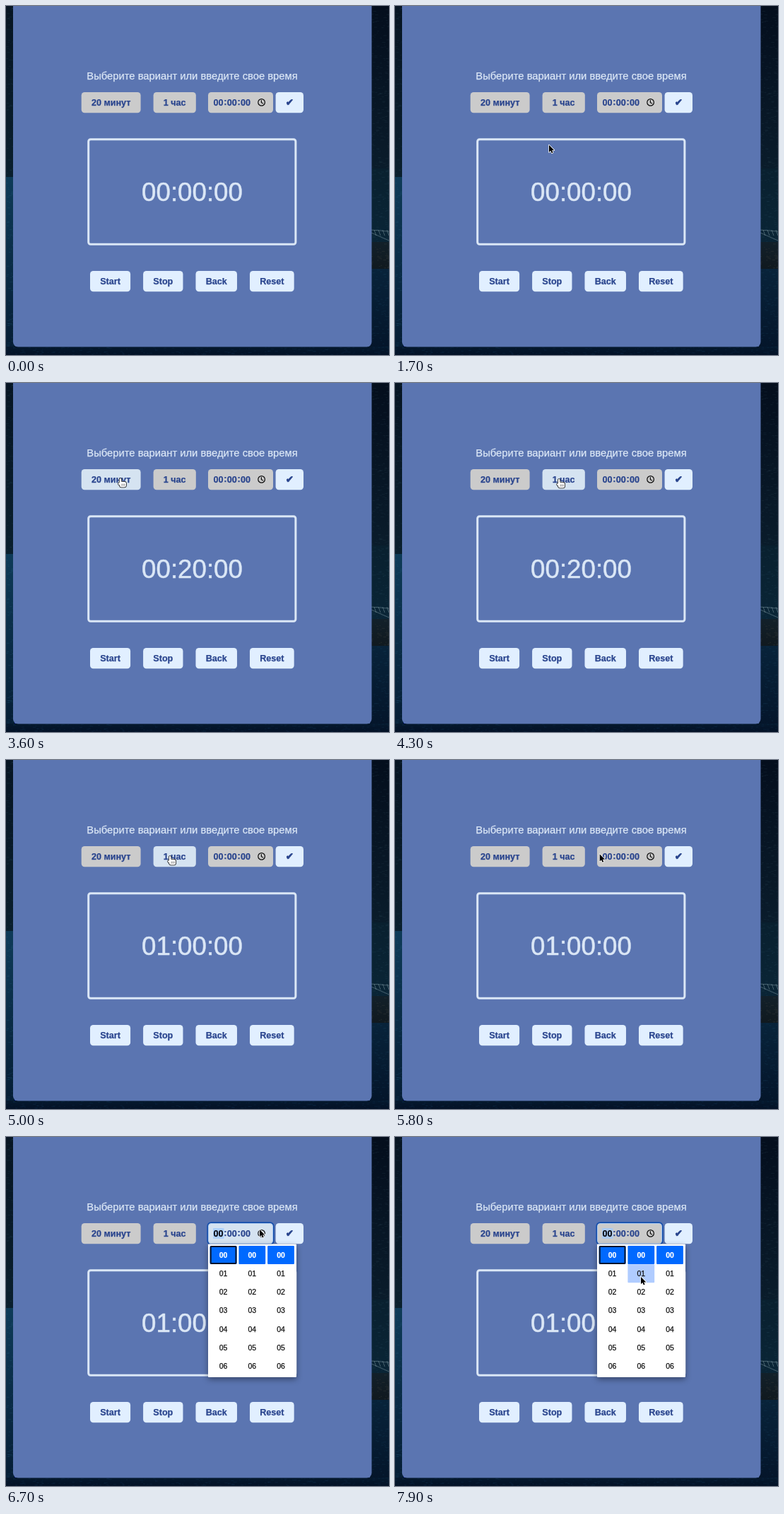
Animation, 542 px wide and 494 px high, one loop 8000 ms. Source, as an HTML page with a canvas:

```html
<!DOCTYPE html>
<html lang="ru">
<head>
<meta charset="utf-8">
<title>Timer</title>
<style>
  html, body { margin: 0; width: 100%; height: 100%; overflow: hidden; background: #06182a; }
  canvas { display: block; width: 542px; height: 494px; }
</style>
</head>
<body>
<canvas id="stage" width="542" height="494"></canvas>
<script>
const W = 542, H = 494, LOOP = 8000, STEP = 100;
const ctx = document.getElementById('stage').getContext('2d');
const FONT = '"Liberation Sans", Arial, sans-serif';
const BOLD = `bold 12.6px ${FONT}`, CHECK = '13.5px "DejaVu Sans", sans-serif';
const PANEL = '#5b75b1', PALE = '#dbe7f6', LIGHT = '#e1efff';
const GRAY = '#cbcbcb', HOVER = '#d5e3f1', NAVY = '#2a458e', BLUE = '#0069ff';
const BTN_H = 29.2, GAP = 18, PAD = 14.2;

// What the viewer does
const PRESS_20 = 2900, SET_20 = 3100, PRESS_60 = 4800, SET_60 = 5000, OPEN_AT = 6600;
const ENTRY = { x: 531, y: 450 };
const MOVES = [
  { start: 900, end: 1200, x: 295, y: 317 },
  { start: 1400, end: 2200, x: 160, y: 135 },
  { start: 3590, end: 4300, x: 232, y: 136 },
  { start: 5560, end: 6400, x: 359, y: 131 },
  { start: 6700, end: 7600, x: 348, y: 198 }
];

const easeOut = (p, power) => 1 - (1 - p) ** power;
const inside = (p, b) => p && p.x >= b.x && p.x < b.x + b.w && p.y >= b.y && p.y < b.y + b.h;

function box(x, y, w, h, r, fill, stroke, lw) {
  ctx.beginPath();
  ctx.roundRect(x, y, w, h, r);
  if (fill) { ctx.fillStyle = fill; ctx.fill(); }
  if (stroke) { ctx.strokeStyle = stroke; ctx.lineWidth = lw; ctx.stroke(); }
}

// A hairline stroke gives the slightly heavier look of desktop smoothing
function text(s, x, y, font, color, align = 'center', weight = .25) {
  ctx.font = font;
  ctx.fillStyle = ctx.strokeStyle = color;
  ctx.textAlign = align;
  ctx.lineWidth = weight;
  ctx.lineJoin = 'round';
  ctx.fillText(s, x, y);
  ctx.strokeText(s, x, y);
}

function layoutRow(x, y, labels) {
  return labels.map(label => {
    ctx.font = BOLD;
    const w = ctx.measureText(label).width + PAD * 2;
    const b = { label, x, y, w, h: BTN_H };
    x += w + GAP;
    return b;
  });
}
const options = layoutRow(106.7, 122, ['20 минут', '1 час']);
const controls = layoutRow(119, 375, ['Start', 'Stop', 'Back', 'Reset']);
const input = { x: 286, y: 122, w: 92, h: BTN_H };
const check = { x: 381.6, y: 122, w: 39.4, h: BTN_H };
const clickable = [...options, ...controls, check];

function makeScene() {
  const c = document.createElement('canvas');
  c.width = W; c.height = H;
  const g = c.getContext('2d');
  let seed = 17;
  const rnd = () => (seed = seed * 16807 % 2147483647) / 2147483647;

  // A shaded area with faint streaks of rock or water
  const area = (x, y, w, h, top, bottom, streak) => {
    const grad = g.createLinearGradient(0, y, 0, y + h);
    grad.addColorStop(0, top);
    grad.addColorStop(1, bottom);
    g.fillStyle = grad;
    g.fillRect(x, y, w, h);
    g.fillStyle = streak;
    for (let i = 0; i < w * h / 32; i++) {
      g.fillRect(x + rnd() * w, y + rnd() * h, 1 + rnd() * 4, 1);
    }
  };
  area(0, 0, 12, 242, '#071523', '#0a1f2d', 'rgba(40,75,95,.2)');
  area(0, 242, 12, 252, '#0e3b58', '#051c33', 'rgba(45,105,140,.2)');
  area(515, 0, 27, 230, '#040e1d', '#0a1c2b', 'rgba(45,70,85,.2)');
  area(515, 230, 27, 104, '#09202f', '#0a2536', 'rgba(45,80,100,.2)');
  area(515, 334, 27, 38, '#12202a', '#10191f', 'rgba(85,85,75,.25)');
  area(515, 372, 27, 122, '#08233a', '#041429', 'rgba(30,75,105,.2)');
  area(0, 482, W, 12, '#05192e', '#031126', 'rgba(25,65,100,.22)');

  // Pier on the right shore
  g.strokeStyle = 'rgba(130,155,165,.5)';
  g.beginPath();
  g.moveTo(517, 317); g.lineTo(W, 319);
  g.moveTo(517, 321); g.lineTo(W, 332);
  for (let x = 521; x < W; x += 6) { g.moveTo(x, 317); g.lineTo(x + 3, 325); }
  g.stroke();

  g.fillStyle = PANEL;
  g.beginPath();
  g.roundRect(10, -10, 507.5, 492.5, 7);
  g.fill();
  return c;
}
const scene = makeScene();

function pointer(t) {
  if (t < MOVES[0].start) return null;
  let { x, y } = ENTRY;
  for (const m of MOVES) {
    if (t < m.start) break;
    const p = Math.min(1, (t - m.start) / (m.end - m.start));
    x += (m.x - x) * easeOut(p, 1.8);
    y += (m.y - y) * easeOut(p, 2.3);
  }
  return { x, y };
}

function drawButton(b, fill = LIGHT, font = BOLD, weight) {
  box(b.x, b.y, b.w, b.h, 4.5, fill);
  text(b.label, b.x + b.w / 2, b.y + 19, font, NAVY, 'center', weight);
}

function drawInput(p, open) {
  const hovered = inside(p, { ...input, x: input.x + 6 });
  box(input.x, input.y, input.w, input.h, 4.5, hovered ? HOVER : GRAY);
  if (open) {
    box(286.5, 122.5, 91, 28.2, 4, null, '#b4cff2', 1);
    box(285.2, 121.2, 93.6, 30.8, 5, null, '#1650ad', 1.7);
    box(293, 129, 15.5, 15, 0, 'rgba(160,203,255,.7)');
  }
  for (let i = 0; i < 3; i++) {
    const x = 293.6 + i * 19.2;
    text('00', x, 141, BOLD, open && i === 0 ? '#06080f' : NAVY, 'left');
    if (i < 2) text(':', x + 14.6, 140.4, BOLD, NAVY, 'left');
  }
  ctx.strokeStyle = '#080808';
  ctx.lineWidth = 1.2;
  ctx.beginPath();
  ctx.arc(361.6, 136.4, 4.8, 0, Math.PI * 2);
  ctx.moveTo(361.4, 133.2);
  ctx.lineTo(361.4, 136.7);
  ctx.lineTo(364, 138);
  ctx.stroke();
}

function drawPicker(p) {
  ctx.save();
  ctx.shadowColor = 'rgba(0,0,0,.4)';
  ctx.shadowBlur = 9;
  ctx.shadowOffsetY = 3;
  box(286, 151.5, 125, 188.5, 1, '#fff');
  ctx.restore();
  for (let col = 0; col < 3; col++) {
    for (let row = 0; row < 7; row++) {
      const cell = { x: 288.7 + col * 40.7, y: 154 + row * 26.15, w: 37.8, h: 26.1 };
      const { x, y, w, h } = cell, first = row === 0;
      if (first) box(x, y, w, h, 1, BLUE);
      else if (inside(p, cell)) box(x, y, w, h, 1, '#b0ccff');
      if (first && col === 0) box(x + 1, y + 1, w - 2, h - 2, 1, null, '#07142c', 2);
      text('0' + row, x + w / 2, y + 17, `${first ? 'bold ' : ''}10.5px ${FONT}`,
        first ? '#fff' : '#111');
    }
  }
}

const arrow = new Path2D('M0 0V10.2L2.3 8.1L3.9 11.5L5.6 10.7L4.1 7.4H7.3Z');
const hand = new Path2D();
hand.roundRect(-1.2, 0, 2.6, 9, 1.3);
hand.roundRect(-1, 4.8, 9.2, 7.6, 2.6);
hand.roundRect(-2.8, 6, 4, 3.2, 1.5);

function drawPointer({ x, y }, overButton) {
  const shape = overButton ? hand : arrow;
  ctx.save();
  ctx.translate(x, y);
  ctx.lineJoin = 'round';
  ctx.lineWidth = 1.6;
  ctx.strokeStyle = overButton ? '#111' : '#fff';
  ctx.fillStyle = overButton ? '#fff' : '#000';
  ctx.stroke(shape);
  ctx.fill(shape);
  if (overButton) {
    ctx.fillStyle = '#555';
    for (let i = 0; i < 3; i++) ctx.fillRect(1.8 + i * 2, 7.6, .7, 3);
  }
  ctx.restore();
}

function draw(t) {
  const p = pointer(t), open = t >= OPEN_AT;
  const time = t < SET_20 ? '00:00:00' : t < SET_60 ? '00:20:00' : '01:00:00';
  const pressed = [PRESS_20 <= t && t < SET_20, PRESS_60 <= t && t < SET_60];
  ctx.drawImage(scene, 0, 0);
  text('Выберите вариант или введите свое время', 263.5, 104, `14.78px ${FONT}`, PALE);
  box(116.7, 188.7, 293.2, 148.6, 3, null, PALE, 3);
  text(time, 263.5, 276, `36.7px ${FONT}`, PALE, 'center', .5);
  options.forEach((b, i) => drawButton(b, pressed[i] ? LIGHT : inside(p, b) ? HOVER : GRAY));
  controls.forEach(b => drawButton(b));
  drawButton({ ...check, label: '✔' }, LIGHT, CHECK, .8);
  drawInput(p, open);
  if (open) drawPicker(p);
  if (p) drawPointer(p, !open && clickable.some(b => inside(p, b)));
}

const start = performance.now();
function frame() {
  const t = (performance.now() - start) % LOOP;
  draw(Math.floor(t / STEP) * STEP);
  requestAnimationFrame(frame);
}
frame();
</script>
</body>
</html>
```
